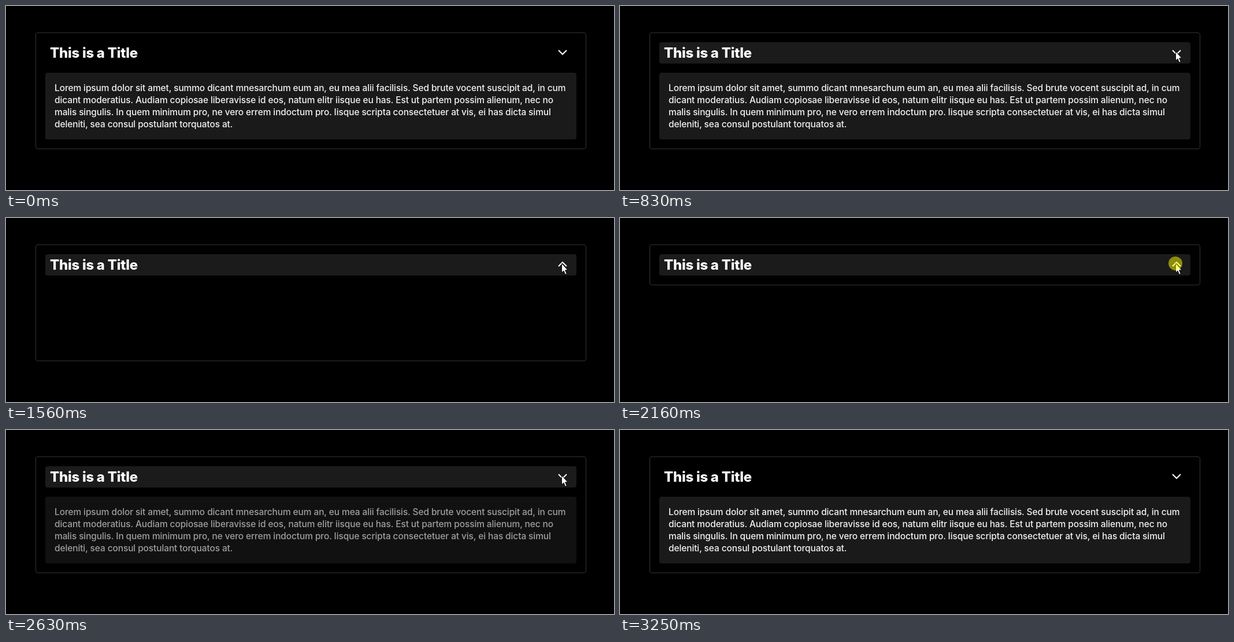
An HTML page for the animation above (4120 ms loop, 1052 by 320 pixels).

```html
<!DOCTYPE html>
<html lang="en">
<head>
<meta charset="utf-8">
<title>Accordion</title>
<style>
  html, body { margin: 0; width: 100%; height: 100%; overflow: hidden; background: #000; }
  svg { display: block; }
  text { font-family: Inter, "Open Sans", sans-serif; white-space: pre; }
  .title { font-size: 24px; font-weight: 800; letter-spacing: -.28px; fill: #fff; }
  .body { font-size: 15.5px; font-weight: 500; letter-spacing: -.12px; fill: #f2f2f2; }
</style>
</head>
<body>
<svg width="1052" height="320" viewBox="0 0 1052 320">
  <rect id="card" x="51.5" y="46.5" width="952" height="202" rx="3.5" fill="none" stroke="#333"/>
  <rect id="hover" x="68" y="63" width="919" height="37" rx="4" fill="#1b1b1b"/>
  <text class="title" x="76" y="90">This is a Title</text>
  <path id="chevron" d="M-7-3.5L0 3.5L7-3.5" fill="none" stroke="#fff" stroke-width="2"/>
  <g id="content">
    <rect x="68" y="116" width="919" height="116" rx="4" fill="#1a1a1a"/>
    <text class="body" x="84" y="148">Lorem ipsum dolor sit amet, summo dicant mnesarchum eum an, eu mea alii facilisis. Sed brute vocent suscipit ad, in cum</text>
    <text class="body" x="84" y="169">dicant moderatius. Audiam copiosae liberavisse id eos, natum elitr iisque eu has. Est ut partem possim alienum, nec no</text>
    <text class="body" x="84" y="190">malis singulis. In quem minimum pro, ne vero errem indoctum pro. Iisque scripta consectetuer at vis, ei has dicta simul</text>
    <text class="body" x="84" y="211">deleniti, sea consul postulant torquatos at.</text>
  </g>
  <path id="cursor" d="M.5 0V16L4 12.8L6.6 19.2L9.2 18.1L6.6 11.8H11Z" fill="#fff" stroke="#000" stroke-width=".9"/>
  <circle id="press" cx="961" cy="79" r="12" fill="#ff0" fill-opacity=".5"/>
</svg>
<script>
const LOOP = 4120;
const [card, hover, chevron, content, cursor, press] =
  ["card", "hover", "chevron", "content", "cursor", "press"].map(id => document.getElementById(id));

const ramp = (t, from, to) => Math.min(1, Math.max(0, (t - from) / (to - from)));
const within = (t, from, to) => t >= from && t < to;
const show = (el, on) => el.setAttribute("visibility", on ? "visible" : "hidden");

// Rise from below, swing onto the chevron, later fall away to the right
function pointerAt(t) {
  const enter = ramp(t, 70, 270), swing = ramp(t, 410, 690), leave = ramp(t, 2770, 3180);
  const x = 992 - 35 * enter ** 2 + 4 * swing + 24 * Math.sin(Math.PI * swing) + 53 * leave;
  const y = 279 - 188 * enter - 12 * swing + 217 * leave ** 2;
  return `translate(${x} ${y})`;
}

function draw(t) {
  const turn = 180 * (ramp(t, 1365, 1560) - ramp(t, 2290, 2490));
  chevron.setAttribute("transform", `translate(963 80.5) rotate(${turn})`);
  content.setAttribute("opacity", 1 - ramp(t, 1360, 1560) + ramp(t, 2500, 2700));
  hover.setAttribute("opacity", ramp(t, 480, 690) - ramp(t, 2900, 3050));
  card.setAttribute("height", within(t, 1690, 2290) ? 70 : 202);
  cursor.setAttribute("transform", pointerAt(t));
  show(cursor, within(t, 70, 3250));
  show(press, within(t, 1300, 1370) || within(t, 2160, 2290));
}

function tick() {
  draw(performance.now() % LOOP);
  requestAnimationFrame(tick);
}
tick();
</script>
</body>
</html>
```
